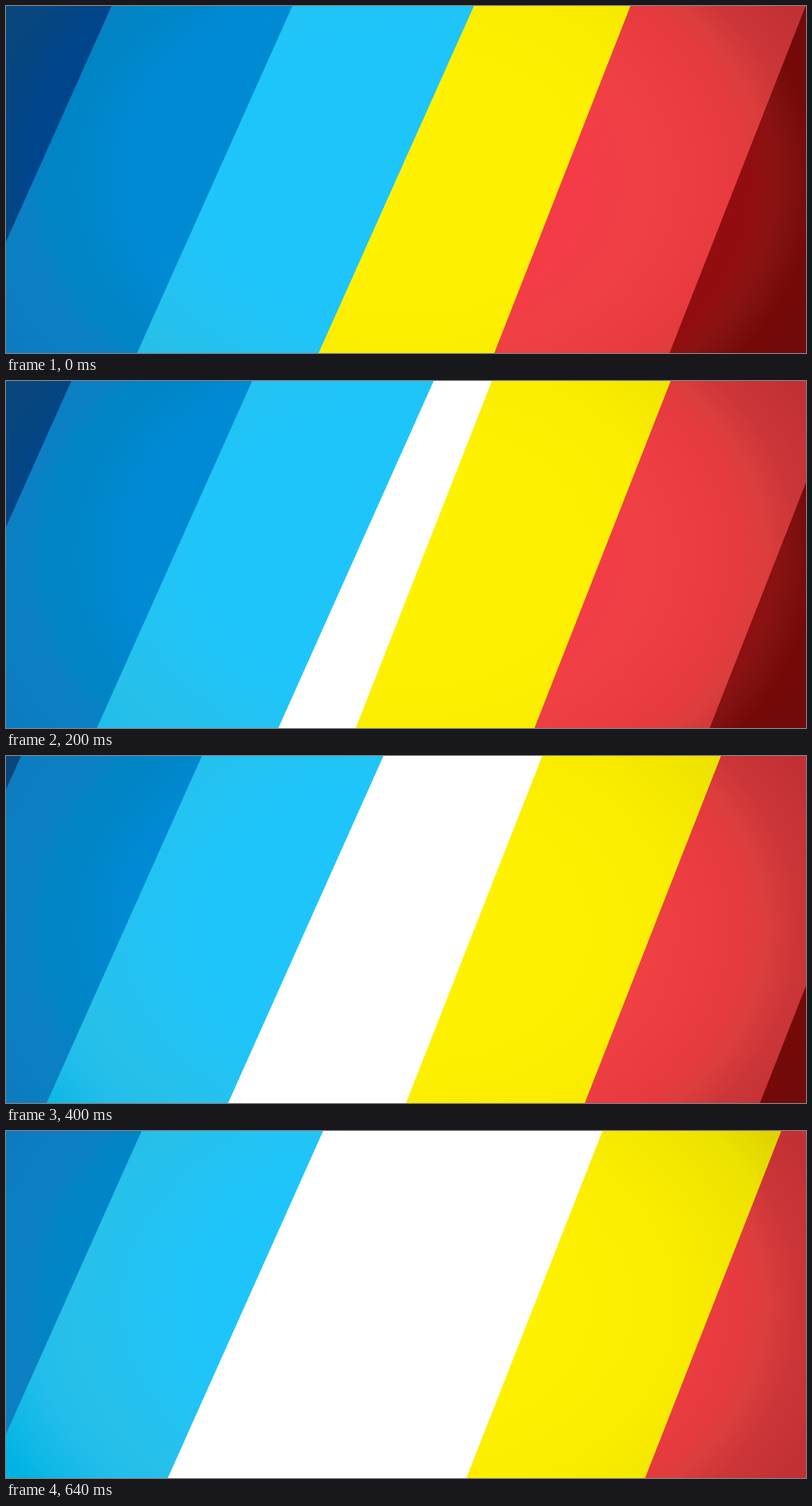
An HTML page that plays this animation: 1137 by 493 pixels, repeating every 0.68 s.

```html
<!DOCTYPE html>
<html lang="en">
<head>
<meta charset="utf-8">
<title>Parting stripes</title>
<style>
  @property --d {
    syntax: "<length>";
    inherits: true;
    initial-value: 0px;
  }
  html, body {
    margin: 0;
    width: 100%;
    height: 100%;
    overflow: hidden;
    background: #fff;
  }
  .stage {
    position: relative;
    width: 1137px;
    height: 493px;
    overflow: hidden;
    background: #fff;
    animation: part 680ms infinite;
  }
  /* Holds for one extra tick, then moves once every 40 ms. */
  @keyframes part {
    0% { --d: 0px; animation-timing-function: step-end; }
    5.882% { --d: 0px; animation-timing-function: steps(16, end); }
    100% { --d: 228.6px; }
  }

  /* The shading stays fixed to the stage; only the clipped edges move. */
  .stage div {
    position: absolute;
    inset: 0;
    background: radial-gradient(640px 470px at 568px 246px, var(--shade));
  }
  .left {
    --x: calc(var(--top) - var(--d));
    clip-path: polygon(-400px 0, var(--x) 0, calc(var(--x) - 220.7px) 493px, -400px 493px);
  }
  .right {
    --x: calc(var(--top) + var(--d));
    clip-path: polygon(1600px 0, var(--x) 0, calc(var(--x) - 193.5px) 493px, 1600px 493px);
  }

  .yellow {
    --top: 633.5px;
    --shade: #fff200 30%, #fdef00 45%, #fbed00 60%, #f3e700 75%, #ede200 85%, #ded200 97%;
  }
  .red {
    --top: 887.5px;
    --shade: #f33c48 40%, #ef4044 54%, #eb3d41 66%, #e63a3e 74%, #dc3d3d 80%, #cc3638 87%, #c23033 100%;
  }
  .maroon {
    --top: 1136.5px;
    --shade: #920d10 77%, #8a1212 82%, #801010 86%, #740a08 91%, #720a0a 100%;
  }
  .sky {
    --top: 665px;
    --shade: #1ec5fb 43%, #22c3f4 58%, #27c0ea 74%, #22bdea 84%, #0db8e6 94%, #00b3e2 100%;
  }
  .blue {
    --top: 407px;
    --shade: #008ad4 62%, #0086c9 72%, #0084c4 79%, #0c80c4 86%, #0c7cc0 100%;
  }
  .navy {
    --top: 150px;
    --shade: #00458b 84%, #05457f 93%, #0a467c 100%;
  }
</style>
</head>
<body>
<div class="stage">
  <div class="right yellow"></div>
  <div class="right red"></div>
  <div class="right maroon"></div>
  <div class="left sky"></div>
  <div class="left blue"></div>
  <div class="left navy"></div>
</div>
</body>
</html>
```
